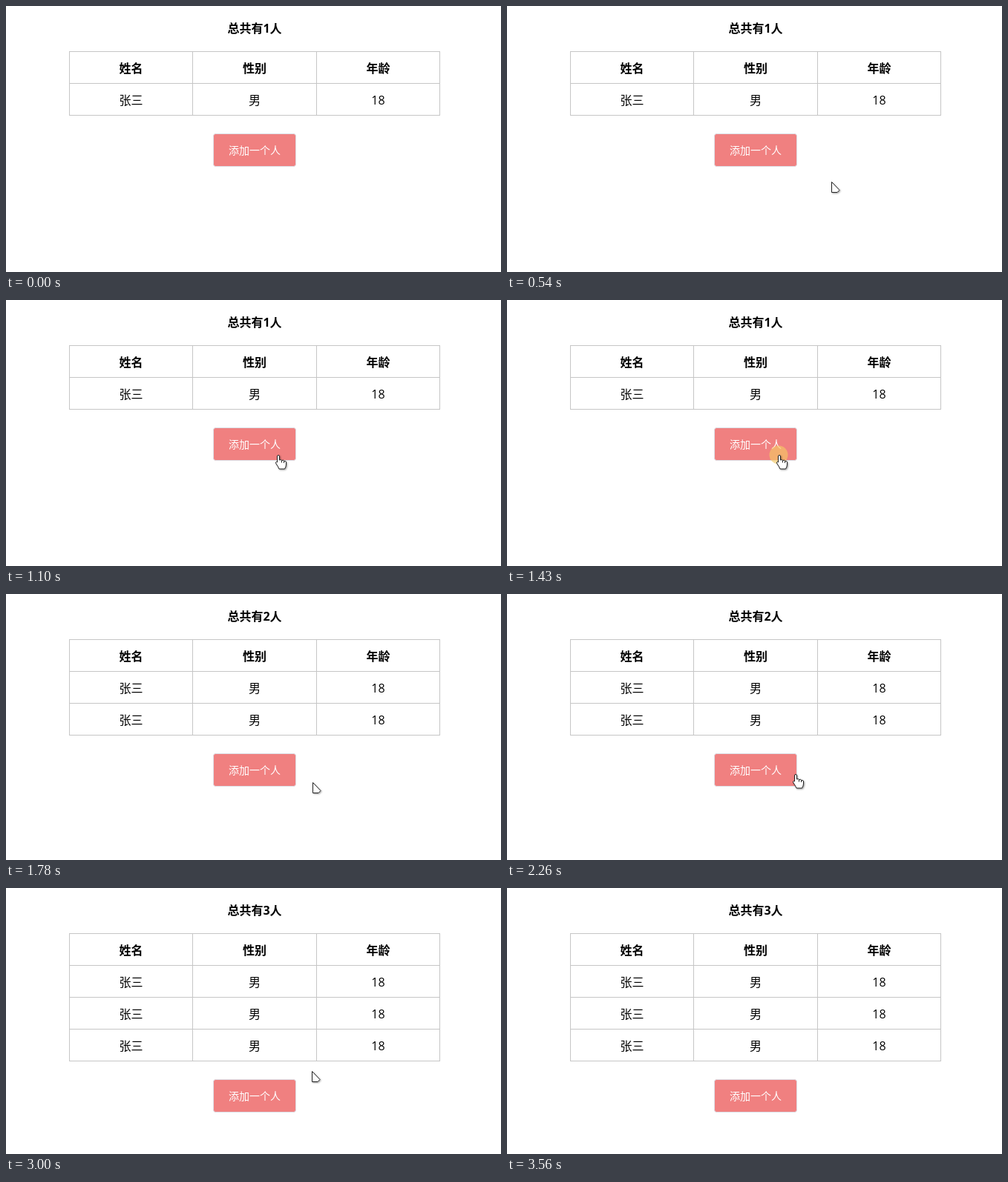
An HTML page for the animation above (3.9 s loop, 667x359 px).

```html
<!DOCTYPE html>
<html lang="zh">
<head>
<meta charset="utf-8">
<style>
  html, body { margin: 0; width: 100%; height: 100%; overflow: hidden; background: #fff; }
  svg { display: block; width: 667px; height: 359px; }
  text { font: 16px "Open Sans", "Noto Sans CJK SC", "Noto Sans CJK", sans-serif; text-anchor: middle; }
  .bold { font-weight: 700; }
  .label { font-size: 14px; fill: #fff; }
  .grid { fill: none; stroke: #c6c6c6; }
  .button { fill: #f08080; stroke: #dcdfe6; }
  .cursor { fill: #fff; stroke: #222; stroke-linejoin: round; filter: drop-shadow(1px 1px 1px rgba(0, 0, 0, .4)); }
</style>
</head>
<body>
<svg viewBox="0 0 667 359">
  <text id="title" class="bold" x="335" y="36"></text>
  <g id="table"></g>
  <g id="button">
    <rect class="button" x="279.5" y="172.5" width="111" height="44" rx="3"/>
    <text class="label" x="335" y="200">添加一个人</text>
  </g>
  <g id="pointer">
    <circle id="click" r="12.5" fill="#f5c864" fill-opacity=".65"/>
    <path id="arrow" class="cursor" d="M.5 .5V14.5H8L11 11.5Z"/>
    <g id="hand" class="cursor">
      <path d="M-.5 10V2a1.5 1.5 0 0 1 3 0V7q3-1 3 .5q3-1 3 1q3-.5 3 1.5V13q0 3-2 6H2q-1-3-4-7q-1.5-2.5 .5-2.5Z"/>
      <path d="M5.5 7.5v3M8.5 8.5v2.5" fill="none"/>
    </g>
  </g>
</svg>
<script>
const LOOP = 3900, ROW = 43, TOP = 61.5;
const COLUMNS = [85.5, 251.5, 418.5, 584.5];
const ADDED = [1437, 2800];
const CLICKS = [[1300, 1437], [2660, 2800]];
const VISIBLE = [70, 3560];

// Each move starts where the previous one ended and is shown in discrete steps.
const START = { x: 685, y: 347 };
const MOVES = [
  { from: 70, to: 540, steps: 8, x: 437, y: 237, power: 2 },
  { from: 610, to: 1100, steps: 8, x: 366, y: 209, power: 1.6 },
  { from: 1437, to: 1780, steps: 6, x: 413, y: 254, power: 1.5 },
  { from: 2050, to: 2530, steps: 7, x: 370, y: 236, power: 1.6 },
  { from: 2800, to: 3000, steps: 3, x: 412, y: 247, power: 1 },
  { from: 3070, to: 3150, steps: 2, x: 544, y: 293, power: 1 },
  { from: 3210, to: 3490, steps: 5, x: 636, y: 349, power: 2 }
];

const $ = id => document.getElementById(id);
const show = (id, on) => $(id).setAttribute("display", on ? "inline" : "none");
const shift = (id, x, y) => $(id).setAttribute("transform", `translate(${x} ${y})`);
const within = (t, [a, b]) => t >= a && t < b;

function position(t) {
  let { x, y } = START;
  for (const move of MOVES) {
    if (t < move.from) break;
    const interval = (move.to - move.from) / (move.steps - 1);
    const step = Math.min(move.steps, Math.floor((t - move.from) / interval + 1e-6) + 1);
    const eased = 1 - (1 - step / move.steps) ** move.power;
    x += (move.x - x) * eased;
    y += (move.y - y) * eased;
  }
  return { x: Math.round(x), y: Math.round(y) };
}

function tableMarkup(people) {
  const rows = [["姓名", "性别", "年龄"], ...Array(people).fill(["张三", "男", "18"])];
  const bottom = TOP + ROW * rows.length;
  let lines = COLUMNS.map(x => `M${x} ${TOP}V${bottom}`).join("");
  for (let y = TOP; y <= bottom; y += ROW) lines += `M85 ${y}H585`;
  const cells = rows.map((row, r) => row.map((word, c) => {
    const x = (COLUMNS[c] + COLUMNS[c + 1]) / 2;
    return `<text class="${r ? "" : "bold"}" x="${x}" y="${(r ? 133 - ROW : 90) + r * ROW}">${word}</text>`;
  }).join("")).join("");
  return `<path class="grid" d="${lines}"/>${cells}`;
}

let shownPeople = 0;
function showPeople(people) {
  if (people === shownPeople) return;
  shownPeople = people;
  $("title").textContent = `总共有${people}人`;
  $("table").innerHTML = tableMarkup(people);
  shift("button", 0, ROW * (people - 1));
}

function render(t) {
  const people = 1 + ADDED.filter(time => t >= time).length;
  showPeople(people);
  const { x, y } = position(t);
  const buttonTop = 173 + ROW * (people - 1);
  const hover = within(x, [280, 390]) && within(y, [buttonTop, buttonTop + 44]);
  shift("pointer", x, y);
  show("pointer", within(t, VISIBLE));
  show("click", CLICKS.some(span => within(t, span)));
  show("hand", hover);
  show("arrow", !hover);
}

const began = performance.now();
function tick() {
  render((performance.now() - began) % LOOP);
  requestAnimationFrame(tick);
}
tick();
</script>
</body>
</html>
```
